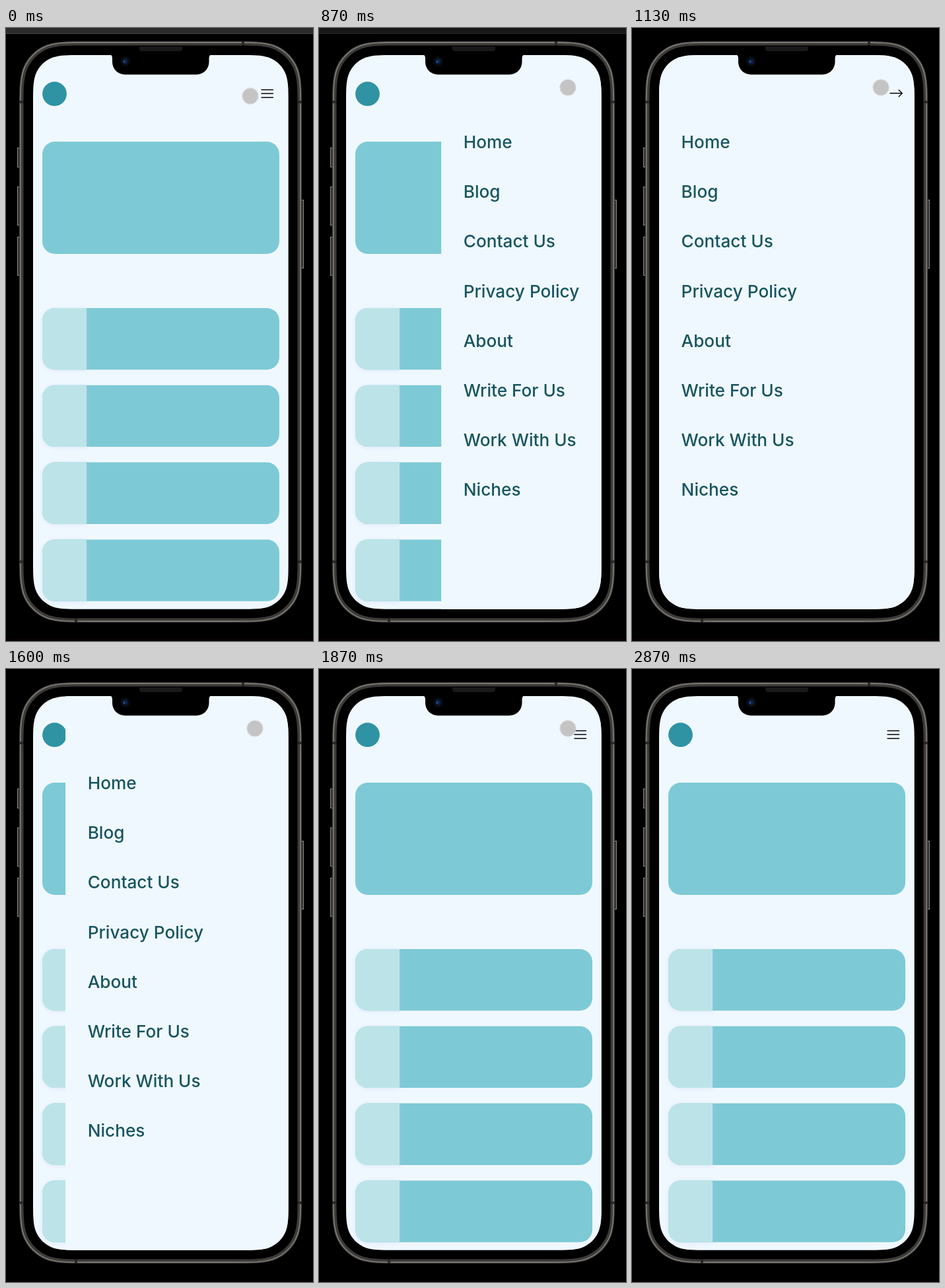
Recreate the animation shown at these times as an HTML page. Size 465 px wide and 928 px high, loop 3.27 s.

```html
<!DOCTYPE html>
<html lang="en">
<head>
<meta charset="utf-8">
<title>Phone menu</title>
<style>
  html, body { margin: 0; height: 100%; overflow: hidden; background: #000; }
  svg { display: block; width: 100vw; height: 100vh; }
  .menu text {
    font: 500 26.2px Inter, sans-serif;
    font-optical-sizing: none;
    fill: #17555f;
  }
  .thumb { fill: #bce4e8; filter: drop-shadow(0 1px 3px #bcd0ee66); }
  .line { fill: none; stroke: #05070c; stroke-width: 1.4; }
  .key { fill: #33312e; stroke: #8d8b86; }
</style>
</head>
<body>
<svg viewBox="0 0 465 928">
  <defs>
    <clipPath id="screen"><path id="glass"/></clipPath>
    <g id="row">
      <rect x="55" width="359" height="93.3" rx="19" fill="#7dcad6"/>
      <path class="thumb" d="M122 0H74a19 19 0 0 0-19 19v55.3a19 19 0 0 0 19 19h48z"/>
    </g>
  </defs>

  <rect width="465" height="928"/>
  <rect y="924" width="465" height="4" fill="#070204"/>
  <g id="bar">
    <rect width="465" height="9" fill="#2b2b2b"/>
    <rect y="8" width="465" height="1" fill="#464646"/>
  </g>

  <g class="key">
    <rect x="17.5" y="181.5" width="4" height="29"/>
    <rect x="17.5" y="240.5" width="4" height="58"/>
    <rect x="17.5" y="316.5" width="4" height="58"/>
    <rect x="446.5" y="260.5" width="4" height="103"/>
  </g>
  <path id="body" fill="#3d3b38"/>
  <path id="rim" fill="none" stroke="#817f7a" stroke-width="1.6"/>
  <path d="M20 112h7M441 112h7M20 808h7M441 808h7M106 893v7M359 20v7" stroke="#2a2927" stroke-width="4"/>
  <path id="bezel"/>

  <g clip-path="url(#screen)">
    <rect x="41" y="41" width="387" height="839" fill="#f0f8ff"/>
    <circle cx="73.5" cy="99.7" r="18.4" fill="#2f93a3"/>
    <path class="line" d="M386.5 93.5H405M386.5 99.3H405M386.5 105.2H405"/>
    <rect x="55" y="172" width="359" height="170" rx="19" fill="#7dcad6"/>
    <use href="#row" y="424"/>
    <use href="#row" y="540.8"/>
    <use href="#row" y="657.6"/>
    <use href="#row" y="774.4"/>
    <g id="menu" class="menu">
      <rect y="41" width="400" height="839" fill="#f0f8ff"/>
      <path class="line" d="M349.5 98.8H368M362.8 93.4L368.2 98.8L362.8 104.2"/>
    </g>
  </g>

  <path d="M156 40q5 0 5 6v5.5a19 19 0 0 0 19 19h108.500a19 19 0 0 0 19-19v-5.500q0-6 5-6z"/>
  <path d="M202 28h65v3q0 4-4 4h-57q-4 0-4-4z" fill="#191919"/>
  <circle cx="180.500" cy="50.500" r="7.500" fill="#080b12"/>
  <circle cx="180.500" cy="50.500" r="4" fill="#0d2040"/>
  <circle cx="179" cy="51" r="1.500" fill="#24569a"/>

  <g id="cursor">
    <circle r="11.500"/>
    <circle r="12" fill="none" stroke="#c0c1c2" stroke-width="1.300" stroke-dasharray="1.600 1.400"/>
  </g>
</svg>

<script>
const LOOP = 3270, FPS = 15;
const OPEN = 729, CLOSE = 1576, SLIDE = 307;
const LEFT = 41, RIGHT = 428;

// time, x, y
const route = [
  [0, 370, 103], [67, 373.5, 97], [133, 375.7, 93], [200, 376.7, 91], [267, 377, 90],
  [2200, 377, 90], [2267, 344, 145], [2467, 200, 430], [2667, 40, 790],
  [2733, 12, 868], [2800, 2, 914], [2867, -14, 945]
];
const labels = ["Home", "Blog", "Contact Us", "Privacy Policy", "About",
  "Write For Us", "Work With Us", "Niches"];

// half of a continuous corner, as distances from the two edges in radii
const corner = [[1.529, 0], [1.088, 0], [0.868, 0], [0.631, 0.075],
  [0.373, 0.169], [0.169, 0.373], [0.075, 0.631], [0, 0.868], [0, 1.088], [0, 1.529]];

const $ = id => document.getElementById(id);
const menu = $("menu"), bar = $("bar"), cursor = $("cursor");

function smoothRect(id, left, top, right, bottom, r) {
  const side = (flipX, flipY) => {
    const pts = corner.map(([a, b]) =>
      [flipX ? right - a * r : left + a * r, flipY ? bottom - b * r : top + b * r]);
    return flipX === flipY ? pts.reverse() : pts;
  };
  const d = [side(0, 0), side(1, 0), side(1, 1), side(0, 1)]
    .map(([first, ...rest]) => `L${first}C${rest.join(" ")}`).join("");
  $(id).setAttribute("d", "M" + d.slice(1) + "Z");
}
smoothRect("body", 20, 20, 448, 900, 67);
smoothRect("rim", 21.9, 21.9, 446.1, 898.1, 65.5);
smoothRect("bezel", 26.5, 26.5, 441.5, 893.5, 61);
smoothRect("glass", LEFT, 41, 427.7, 879.7, 47.5);

labels.forEach((label, i) => {
  const text = document.createElementNS("http://www.w3.org/2000/svg", "text");
  text.setAttribute("x", 33.6);
  text.setAttribute("y", 182 + 75.2 * i);
  text.textContent = label;
  menu.append(text);
});

const clamp = v => Math.min(1, Math.max(0, v));

// cubic-bezier(0, 0, .58, 1)
function easeOut(x) {
  let lo = 0, hi = 1;
  for (let i = 0; i < 24; i++) {
    const s = (lo + hi) / 2;
    if (1.74 * s * s * (1 - s) + s ** 3 < x) lo = s; else hi = s;
  }
  return lo * lo * (3 - 2 * lo);
}

const slide = (t, start) => easeOut(clamp((t - start) / SLIDE));

function cursorAt(t) {
  const i = route.findIndex(p => p[0] > t);
  if (i < 0) return route[route.length - 1].slice(1);
  const [t0, x0, y0] = route[i - 1], [t1, x1, y1] = route[i];
  const k = (t - t0) / (t1 - t0);
  return [x0 + (x1 - x0) * k, y0 + (y1 - y0) * k];
}

const move = (el, x, y) => el.setAttribute("transform", `translate(${x} ${y})`);

function draw(t) {
  const shown = slide(t, OPEN) - slide(t, CLOSE);
  move(menu, RIGHT - (RIGHT - LEFT) * shown, 0);
  bar.setAttribute("opacity", (1 - clamp((t - OPEN - 5) / 400)) ** 1.5);

  const pressed = (t > 720 && t < 790) || (t > 1460 && t < 1590);
  cursor.setAttribute("fill", pressed ? "#b6babd" : "#c4c4c4");
  cursor.setAttribute("visibility", t < 2860 ? "visible" : "hidden");
  move(cursor, ...cursorAt(t));
}

function tick() {
  const t = performance.now() % LOOP;
  draw(Math.floor((t + 4) * FPS / 1000) * 1000 / FPS);
  requestAnimationFrame(tick);
}
tick();
</script>
</body>
</html>
```
